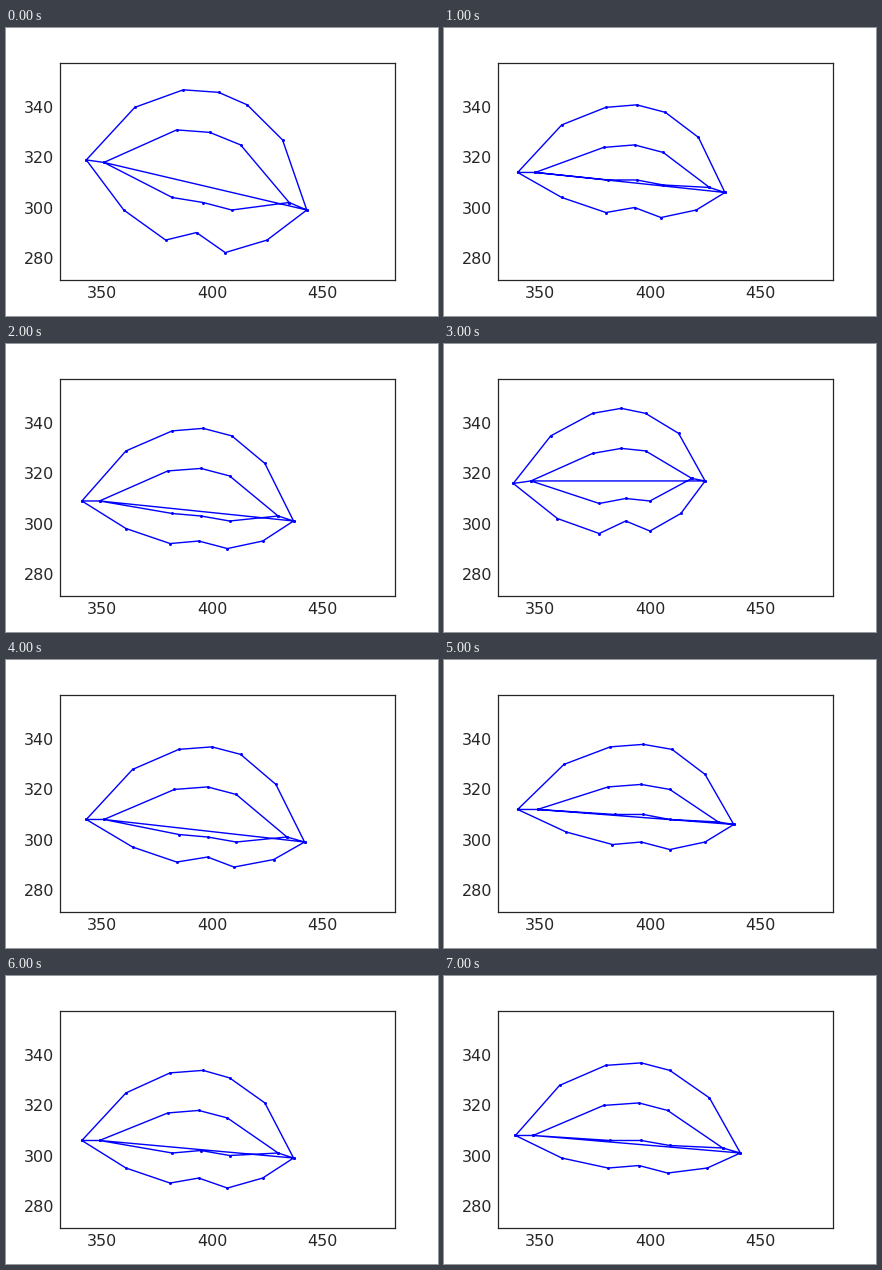
Write a matplotlib script that moves like this. It is 432 by 288 pixels and loops after 8 s.

```python
import numpy as np
import matplotlib.pyplot as plt
from matplotlib.animation import FuncAnimation

DPI = 72
INK = "0.15"

plt.rcParams["font.family"] = "DejaVu Sans"

# Points along each lip, as fractions of the mouth's width.
FULL_T = np.array([0.19, 0.395, 0.545, 0.68, 0.85])
BOW_T = np.array([0.22, 0.43, 0.565, 0.695, 0.864])
INNER_LEFT, INNER_RIGHT = 0.085, 0.922

# Height profiles: a smooth arch and a bow with a dip in the middle.
ARCH = 1 - np.abs(np.arange(-2, 3) / 3) ** 2.6
BOW = np.array([0.69, 1, 0.79, 0.98, 0.65])
LIP = 16

# Both corners, full lip, bow lip, inner edge of the bow lip, sideways turn.
POSES = [
    (343 + 319j, 443 + 299j, 38.2, -24.0, -7.0, -0.025),
    (340 + 314j, 434 + 306j, 31.5, -12.5, 0.5, 0.006),
    (341 + 309j, 437 + 301j, 33.0, -14.0, -2.0, 0.0),
    (338 + 316j, 425 + 317j, 29.5, -20.2, -8.0, 0.02),
    (343 + 308j, 442 + 299j, 34.0, -13.2, -2.5, -0.005),
    (340 + 312j, 438 + 306j, 29.5, -11.7, 0.2, 0.015),
    (341 + 306j, 437 + 299j, 32.0, -14.0, -1.5, 0.0),
    (339 + 308j, 441 + 301j, 32.8, -10.2, 1.0, -0.012),
]


def mouth(left, right, full, bow, gap, turn):
    """Both lips as one stroke, in a frame tilted along the corners."""
    arch = full * ARCH
    t = np.array([0, *BOW_T, 1, INNER_RIGHT, *BOW_T[3:0:-1], INNER_LEFT,
                  1, *FULL_T[::-1], 0, INNER_LEFT, *FULL_T[1:4], INNER_RIGHT])
    h = np.array([0, *bow * BOW, 0, 1, gap, gap + 1, gap, 1,
                  0, *arch[::-1], 0, 1, *arch[1:4] - LIP, 1])
    t = t + turn * np.sin(np.pi * t)
    axis = right - left
    z = left + t * axis + 1j * h * axis / abs(axis)
    return np.round(z.real), np.round(z.imag)


fig = plt.figure(figsize=(432 / DPI, 288 / DPI), dpi=DPI, facecolor="white")
ax = fig.add_axes([0.125, 0.125, 0.775, 0.755])
ax.set_xlim(331.08, 482.92)
ax.set_ylim(271.05, 357.89)
ax.set_xticks([350, 400, 450])
ax.set_yticks([280, 300, 320, 340])
ax.tick_params(length=0, pad=5.6, labelsize=16, labelcolor=INK)
for spine in ax.spines.values():
    spine.set(color=INK, linewidth=1.25)

(line,) = ax.plot([], [], "o-", color="blue", linewidth=1.4,
                  markersize=3, markeredgewidth=0)


def draw(i):
    line.set_data(*mouth(*POSES[i]))
    return (line,)


anim = FuncAnimation(fig, draw, frames=len(POSES), interval=1000,
                     repeat=True, repeat_delay=0)
plt.show()
```
